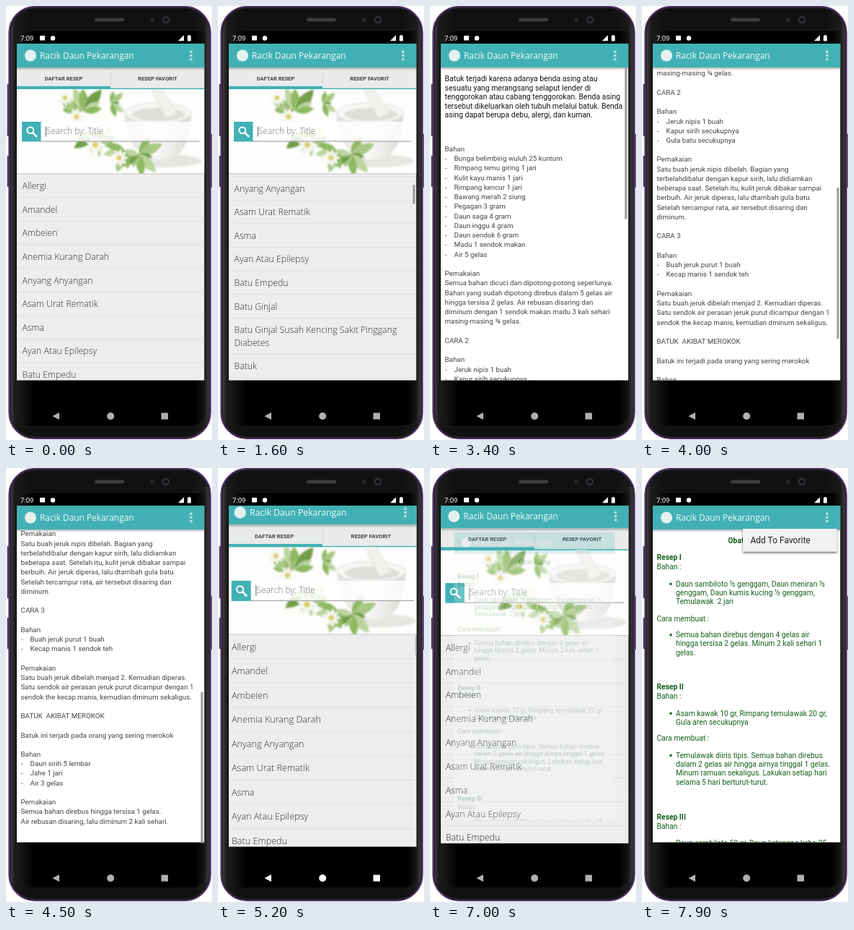
Recreate the animation shown at these times as an HTML page. Size 286 px wide and 600 px high, loop 8000 ms.

```html
<!DOCTYPE html>
<html lang="id">
<head>
<meta charset="utf-8">
<style>
html, body { margin: 0; width: 286px; height: 600px; overflow: hidden; background: #fff; }
svg { display: block; }
text { white-space: pre; }
.ui { font-family: "Open Sans", "Noto Sans", sans-serif; }
.row { font: 300 12.3px "Open Sans", "Noto Sans", sans-serif; fill: #333; }
.rb { font-family: Roboto, sans-serif; }
</style>
</head>
<body>
<svg width="286" height="600" viewBox="0 0 286 600">
  <defs>
    <linearGradient id="body" x2="1" y2="0">
      <stop offset="0" stop-color="#4a4a4c"/><stop offset=".03" stop-color="#1a1a1b"/>
      <stop offset=".1" stop-color="#111"/><stop offset=".9" stop-color="#111"/>
      <stop offset=".97" stop-color="#1a1a1b"/><stop offset="1" stop-color="#4a4a4c"/>
    </linearGradient>
    <linearGradient id="chin" x2="1" y2="0">
      <stop offset="0" stop-color="#1d1d1e"/><stop offset=".09" stop-color="#000"/>
      <stop offset=".95" stop-color="#000"/><stop offset="1" stop-color="#151515"/>
    </linearGradient>
    <linearGradient id="bowl" x2="1" y2="0">
      <stop offset="0" stop-color="#dfe0dc"/><stop offset=".45" stop-color="#fafaf8"/>
      <stop offset="1" stop-color="#d9d9d6"/>
    </linearGradient>
    <linearGradient id="shade" x2="0" y2="1">
      <stop offset="0" stop-color="#000" stop-opacity=".28"/><stop offset="1" stop-color="#000" stop-opacity="0"/>
    </linearGradient>
    <filter id="soft"><feGaussianBlur stdDeviation=".9"/></filter>
    <filter id="drop" x="-10%" y="-20%" width="120%" height="160%">
      <feDropShadow dx="0" dy="2" stdDeviation="1.8" flood-opacity=".55"/>
    </filter>
    <clipPath id="screen"><rect x="15" y="52" width="260.5" height="493"/></clipPath>
    <clipPath id="page"><rect x="15" y="84" width="260.5" height="433.5"/></clipPath>
    <clipPath id="rows"><rect x="15" y="232" width="260.5" height="285.5"/></clipPath>
    <clipPath id="photo"><rect x="15" y="115" width="260.5" height="117"/></clipPath>
  </defs>

  <g id="phone">
    <path d="M2.8 108V180M2.8 207V250M284.6 177V251" stroke="#4b2a5e" stroke-width="2.4"/>
    <rect x="4.2" y=".8" width="279.8" height="597.4" rx="36" fill="url(#body)" stroke="#5a3570" stroke-width="1.8"/>
    <rect x="6" y="2.6" width="276.2" height="593.8" rx="34" fill="none" stroke="#26232a" stroke-width="1.6"/>
    <path d="M15 35H275.5V560Q275.5 580 255 580H35Q15 580 15 560Z" fill="url(#chin)"/>
    <rect x="123" y="16.5" width="41" height="5" rx="2.5" fill="#3d3d40"/>
    <circle cx="203" cy="19" r="3" fill="#25272c"/>
    <circle cx="222" cy="19" r="5.5" fill="#2a2c33"/><circle cx="222" cy="19" r="2.6" fill="#0d0f14"/>
  </g>

  <g id="statusbar" fill="#fff">
    <text class="rb" x="20" y="48" font-size="9.6">7:09</text>
    <rect x="47" y="41" width="7" height="6.5"/>
    <circle cx="65" cy="44.5" r="3.2"/>
    <path d="M239 48.3L247 40.3V48.3ZM252 41.2h1.3v-1.2h2.2v1.2h1.3v7.3h-4.8Z"/>
  </g>

  <g id="nav">
    <path d="M74 562V572L64.5 567Z"/><circle cx="145.2" cy="567" r="5"/><rect x="215.5" y="562.5" width="9.5" height="9"/>
  </g>

  <g clip-path="url(#screen)">
    <g id="list"></g>
    <g id="cough"></g>
    <g id="allergy"></g>
  </g>
</svg>

<script>
(() => {
const $ = id => document.getElementById(id);
const LOOP = 8000, TEAL = '#42b1b5';

const bar = `
  <rect x="15" y="52" width="260.5" height="33" fill="${TEAL}"/>
  <circle cx="34" cy="68.5" r="8" fill="#e4f1f1"/>
  <text class="ui" x="47" y="72.8" font-size="11.9" fill="#eefafa">Racik Daun Pekarangan</text>
  <g fill="#b4e0e2"><rect x="255.2" y="61.7" width="3.4" height="3.2"/><rect x="255.2" y="66.8" width="3.4" height="3.2"/><rect x="255.2" y="71.9" width="3.4" height="3.2"/></g>`;
const barShade = '<rect x="15" y="85" width="260.5" height="4" fill="url(#shade)"/>';
const sheet = color => `<rect x="15" y="52" width="260.5" height="465.5" fill="${color}"/>`;
const thumb = h => `<rect class="thumb" x="270.5" width="3" height="${h}" fill="#999"/>`;

// Header picture
const leaf = (x, y, len, turn, color, fat = .3) =>
  `<path transform="translate(${x} ${y}) rotate(${turn})" fill="${color}"
    d="M0 0Q${len * .45} ${-len * fat * 1.3} ${len} 0Q${len * .45} ${len * fat * 1.3} 0 0Z"/>`;
const daisy = (x, y, r) => {
  let s = '';
  for (let a = 0; a < 360; a += 40) s += leaf(x, y, r, a, '#f7f8f1', .28);
  return s + `<circle cx="${x}" cy="${y}" r="${r * .28}" fill="#dccf6a"/>`;
};
const greens = ['#8fb962', '#a9c886', '#739f4a', '#bcd5a0'];
function spray(x, y, n, from, to, len) {
  let s = '';
  for (let i = 0; i < n; i++)
    s += leaf(x, y, len * (.75 + .25 * Math.sin(i * 2.3)), from + (to - from) * i / (n - 1), greens[i % 4]);
  return s;
}
const photo = `<g clip-path="url(#photo)"><rect x="15" y="115" width="261" height="117" fill="#fdfdfc"/>
  <g filter="url(#soft)">
    <ellipse cx="222" cy="214" rx="50" ry="9" fill="#e6e7e3"/>
    <path d="M165 150Q167 196 196 208Q218 217 236 207Q256 194 257 148Z" fill="url(#bowl)"/>
    <ellipse cx="211" cy="148" rx="46" ry="14" fill="#f6f6f4" stroke="#d8d8d4"/>
    <ellipse cx="212" cy="150" rx="37" ry="9" fill="#dededa"/>
    <path d="M199 109L210 104L238 148L222 155Z" fill="#f1f1ee" stroke="#e0e0dc"/>
    ${spray(108, 146, 9, -175, -10, 40)}${spray(146, 135, 5, -80, 70, 24)}
    ${spray(125, 175, 8, 20, 165, 38)}${spray(185, 205, 8, -60, 190, 38)}
    ${spray(165, 200, 5, 80, 200, 34)}
    ${daisy(82, 127, 12)}${daisy(98, 153, 13)}${daisy(124, 192, 15)}${daisy(157, 210, 13)}${daisy(143, 172, 11)}
  </g></g>`;

// List screen
const names = ['Allergi', 'Amandel', 'Ambeien', 'Anemia Kurang Darah', 'Anyang Anyangan', 'Asam Urat Rematik',
  'Asma', 'Ayan Atau Epilepsy', 'Batu Empedu', 'Batu Ginjal',
  'Batu Ginjal Susah Kencing Sakit Pinggang|Diabetes', 'Batuk', 'Batuk Rejan'];
let rowY = 232.5, rows = '';
for (const name of names) {
  const parts = name.split('|');
  parts.forEach((s, i) => rows += `<text class="row" x="22.5" y="${rowY + 20.7 + i * 17.5}">${s}</text>`);
  rowY += 32.6 + (parts.length - 1) * 17.5;
  rows += `<rect x="15" y="${rowY - .6}" width="260.5" height=".8" fill="#dedede"/>`;
}
$('list').innerHTML = sheet('#ededed') + bar + `
  <rect x="15" y="85" width="260.5" height="30" fill="#e9eaea"/>${barShade}
  <g class="rb" font-size="7.5" font-weight="700" fill="#444" text-anchor="middle">
    <text x="80" y="102.6">DAFTAR RESEP</text><text x="210.5" y="102.6">RESEP FAVORIT</text></g>
  <rect x="145" y="92" width=".8" height="16" fill="#ccc"/>
  <rect x="15" y="113.6" width="260.5" height="1.6" fill="${TEAL}"/>
  <rect x="15" y="110.8" width="130" height="4.4" fill="${TEAL}"/>
  ${photo}
  <rect x="48" y="160" width="220.5" height="27" fill="#fff" opacity=".8"/>
  <rect x="48" y="186.4" width="220.5" height="1.3" fill="#aaa"/>
  <rect x="22" y="160" width="26.5" height="27.5" fill="${TEAL}"/>
  <g fill="none" stroke="#fff" stroke-width="2"><circle cx="33.8" cy="171.8" r="4.4"/><path d="M37 175L43 181" stroke-width="2.6"/></g>
  <rect x="55" y="166.5" width=".9" height="14" fill="#555"/>
  <text class="row" x="56" y="176.5" style="font-size:11.8px;fill:#777">Search by: Title</text>
  <g clip-path="url(#rows)"><g class="scroll">${rows}</g></g>
  <rect x="15" y="231.5" width="260.5" height="1" fill="#c4c4c4"/>${thumb(26)}`;

// Long recipe
const intro = ['Batuk terjadi karena adanya benda asing atau', 'sesuatu yang merangsang selaput lender di',
  'tenggorokan atau cabang tenggorokan. Benda asing', 'tersebut dikeluarkan oleh tubuh melalui batuk. Benda',
  'asing dapat berupa debu, alergi, dan kuman.'];
const recipe = `Bahan
-Bunga belimbing wuluh 25 kuntum
-Rimpang temu giring 1 jari
-Kulit kayu manis 1 jari
-Rimpang kencur 1 jari
-Bawang merah 2 siung
-Pegagan 3 gram
-Daun saga 4 gram
-Daun inggu 4 gram
-Daun sendok 6 gram
-Madu 1 sendok makan
-Air 5 gelas

Pemakaian
Semua bahan dicuci dan dipotong-potong seperlunya.
Bahan yang sudah dipotong direbus dalam 5 gelas air
hingga tersisa 2 gelas. Air rebusan disaring dan
diminum dengan 1 sendok makan madu 3 kali sehari
masing-masing ¾ gelas.

CARA 2

Bahan
-Jeruk nipis 1 buah
-Kapur sirih secukupnya
-Gula batu secukupnya

Pemakaian
Satu buah jeruk nipis dibelah. Bagian yang
terbelahdibalur dengan kapur sirih, lalu didiamkan
beberapa saat. Setelah itu, kulit jeruk dibakar sampai
berbuih. Air jeruk diperas, lalu dtambah gula batu.
Setelah tercampur rata, air tersebut disaring dan
diminum.

CARA 3

Bahan
-Buah jeruk purut 1 buah
-Kecap manis 1 sendok teh

Pemakaian
Satu buah jeruk dibelah menjad 2. Kemudian diperas.
Satu sendok air perasan jeruk purut dicampur dengan 1
sendok the kecap manis, kemudian dminum sekaligus.

BATUK  AKIBAT MEROKOK

Batuk ini terjadi pada orang yang sering merokok

Bahan
-Daun sirih 5 lembar
-Jahe 1 jari
-Air 3 gelas

Pemakaian
Semua bahan direbus hingga tersisa 1 gelas.
Air rebusan disaring, lalu diminum 2 kali sehari.`.split('\n');
const recipeText = recipe.map((s, i) => {
  const y = 201 + i * 13.24;
  return s[0] === '-' ? `<text x="21" y="${y}">-</text><text x="33.5" y="${y}">${s.slice(1)}</text>`
    : `<text x="20.5" y="${y}">${s}</text>`;
}).join('');
$('cough').innerHTML = sheet('#fff') + `<g clip-path="url(#page)"><g class="scroll rb">
  <g font-size="10.5" fill="#151515">${intro.map((s, i) => `<text x="20.5" y="${104.3 + i * 12.5}">${s}</text>`).join('')}</g>
  <g font-size="9.8" fill="#444">${recipeText}</g></g></g>` + bar + barShade + thumb(209);

// Short recipe with menu: style, centre line, text
const green = [
  ['b', 123, 'Resep I'], ['', 136, 'Bahan :'],
  ['*', 160, 'Daun sambiloto ½ genggam, Daun meniran ½'], ['-', 172, 'genggam, Daun kumis kucing ½ genggam,'], ['-', 184, 'Temulawak  2 jari'],
  ['', 208, 'Cara membuat :'],
  ['*', 230.5, 'Semua bahan direbus dengan 4 gelas air'], ['-', 242.5, 'hingga tersisa 2 gelas. Minum 2 kali sehari 1'], ['-', 255, 'gelas.'],
  ['b', 302.5, 'Resep II'], ['', 315, 'Bahan :'],
  ['*', 339, 'Asam kawak 10 gr, Rimpang temulawak 20 gr,'], ['-', 351, 'Gula aren secukupnya'],
  ['', 373.5, 'Cara membuat :'],
  ['*', 397, 'Temulawak diiris tipis. Semua bahan direbus'], ['-', 409, 'dalam 2 gelas air hingga airnya tinggal 1 gelas.'],
  ['-', 421.5, 'Minum ramuan sekaligus. Lakukan setiap hari'], ['-', 434, 'selama 5 hari berturut-turut.'],
  ['b', 482, 'Resep III'], ['', 495, 'Bahan :'],
  ['*', 518.5, 'Daun sambiloto 50 gr, Daun ketepeng kebo 25'],
].map(([kind, y, s]) => {
  const item = kind === '*' || kind === '-';
  return (kind === '*' ? `<circle cx="40" cy="${y + .3}" r="1.7"/>` : '') +
    `<text x="${item ? 47 : 20.5}" y="${y + 3.6}"${kind === 'b' ? ' font-weight="700"' : ''}>${s}</text>`;
}).join('');
$('allergy').innerHTML = sheet('#fff') + `<g class="rb" clip-path="url(#page)" font-size="10.3" fill="#12611a">
  <text x="145.5" y="103.8" text-anchor="middle" font-weight="700">Obat Alergi</text>${green}</g>` + bar + barShade + `
  <g id="menu"><rect x="140" y="84" width="130.5" height="31.5" fill="#f1f1f1" filter="url(#drop)"/>
  <text class="rb" x="150.5" y="104.3" font-size="12" fill="#222">Add To Favorite</text></g>`;

// Motion
const clamp = v => Math.max(0, Math.min(1, v));
const part = (t, from, to) => clamp((t - from) / (to - from));
const mix = (a, b, p) => a + (b - a) * p;
const smooth = p => p * p * (3 - 2 * p);
// Cubic curve (.4, 0, .2, 1)
function swift(x) {
  let lo = 0, hi = 1, u = .5;
  for (let i = 0; i < 20; i++) {
    u = (lo + hi) / 2;
    if (1.2 * u * (1 - u) ** 2 + .6 * u * u * (1 - u) + u ** 3 < x) lo = u; else hi = u;
  }
  return smooth(u);
}
function pose(id, shown, scale, alpha) {
  const g = $(id);
  g.setAttribute('display', shown ? 'inline' : 'none');
  g.setAttribute('opacity', alpha);
  g.setAttribute('transform', `translate(145.2 310) scale(${scale}) translate(-145.2 -310)`);
}
function slide(id, y, thumbY, alpha) {
  $(id).querySelector('.scroll').setAttribute('transform', `translate(0 ${-y})`);
  const mark = $(id).querySelector('.thumb');
  mark.setAttribute('y', thumbY);
  mark.setAttribute('opacity', alpha);
}
const visible = (t, on, off) => part(t, on, on + 60) * (1 - part(t, off, off + 250));

const OPEN1 = 2800, BACK = 5020, OPEN2 = 6950, DUR = 400;
function draw(t) {
  const open1 = swift(part(t, OPEN1, OPEN1 + DUR)), back = swift(part(t, BACK, BACK + DUR)),
    open2 = swift(part(t, OPEN2, OPEN2 + DUR));
  const returned = t >= BACK;

  const listScale = !returned ? mix(1, 1.15, open1) : t < OPEN2 ? mix(1.1, 1, back) : mix(1, 1.15, open2);
  pose('list', t < OPEN1 + DUR || returned && t < OPEN2 + DUR, listScale, 1);
  const y = returned ? 0 : 127 * smooth(part(t, 900, 1500));
  slide('list', y, 234 + y * .105, Math.max(visible(t, 900, 2300), visible(t, BACK, 6500)));

  pose('cough', t >= OPEN1 && t < BACK + 120, returned ? mix(1, .9, back) : mix(.85, 1, open1),
    returned ? 1 - part(t, BACK + 35, BACK + 118) : part(t, OPEN1 + 30, OPEN1 + 130));
  const down = 343 * smooth(part(t, 3620, 3980)) + 121 * smooth(part(t, 4040, 4450));
  slide('cough', down, 85.5 + down * .483, 1 - part(t, 4650, 4900));

  pose('allergy', t >= OPEN2, mix(.85, 1, open2), part(t, OPEN2 + 30, OPEN2 + 130));
  const pop = part(t, 7730, 7860), s = mix(.6, 1, smooth(pop));
  $('menu').setAttribute('opacity', pop);
  $('menu').setAttribute('transform', `translate(270.5 84) scale(${s}) translate(-270.5 -84)`);

  $('nav').setAttribute('fill', t >= BACK && t < OPEN2 ? '#fff' : '#b0b0b0');
}
function tick(now) {
  draw(now % LOOP);
  requestAnimationFrame(tick);
}
draw(0);
requestAnimationFrame(tick);
})();
</script>
</body>
</html>
```
